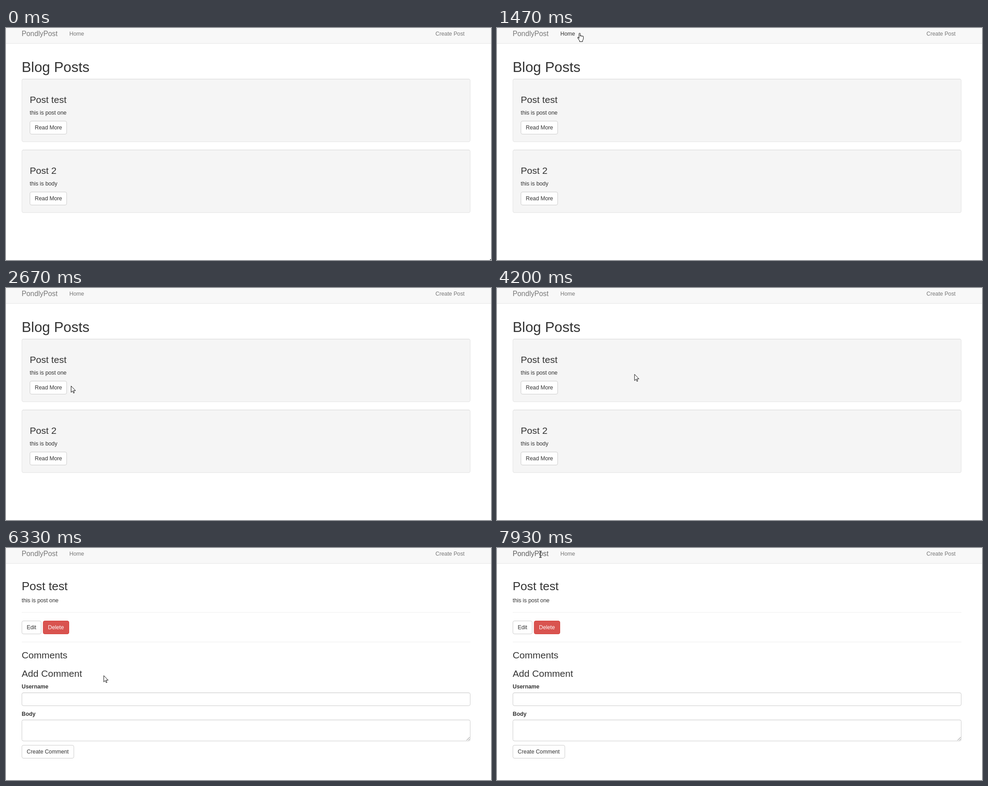
Animation, 1083 px wide and 517 px high, one loop 8 s. Source, as an HTML page:

```html
<!DOCTYPE html>
<html lang="en">
<head>
<meta charset="utf-8">
<title>Blog walkthrough</title>
<style>
html, body { margin: 0; width: 100%; height: 100%; overflow: hidden; background: #fff; }
svg { display: block; }
text { font: 12.32px "Liberation Sans", Arial, sans-serif; fill: #333; white-space: pre; }
.h1 { font-size: 31.68px; }
.h2 { font-size: 26.4px; }
.h3 { font-size: 21.12px; }
.label { font-weight: bold; }
.nav { fill: #777; }
.brand { font-size: 15.84px; }
#brand.on { fill: #5e5e5e; }
#home.on { fill: #333; }
.well { fill: #f5f5f5; stroke: #e3e3e3; }
.btn, .field { fill: #fff; stroke: #ccc; }
.danger { fill: #d9534f; stroke: #d43f3a; }
.white { fill: #fff; }
.btn.on { fill: #e6e6e6; stroke: #adadad; }
.btn.press { fill: #d4d4d4; stroke: #8c8c8c; }
#cursor path { fill: #fff; stroke: #000; stroke-width: 1.1; stroke-linejoin: round; }
#cursor #beam { fill: none; }
</style>
</head>
<body>
<svg width="1083" height="517" viewBox="0 0 1083 517">
  <rect width="1083" height="34" fill="#f8f8f8"/>
  <rect y="34" width="1083" height="1" fill="#e7e7e7"/>
  <g id="list"></g>
  <g id="post"></g>
  <g id="nav"></g>
  <g id="cursor">
    <path id="arrow" transform="scale(.88)" d="M.5.5V16.5L4.2 13 6.6 18.5 8.8 17.6 6.5 12.2H11.7Z"/>
    <path id="hand" transform="scale(.9) translate(-6.5 0)" d="M5 13.5V2a1.5 1.5 0 0 1 3 0V8q0-1.5 1.4-1.5t1.4 1.5v.5q0-1.2 1.3-1.2t1.3 1.5q0-1 1.2-1t1.2 1.5V15l-2 4v2.5h-7.5V19l-4.3-6q-1.2-2.2.6-2.5 1 0 2.4 3Z"/>
    <path id="beam" d="M-3-7H-.8L0-6.3.8-7H3M0-6.3V6.3M-3 7H-.8L0 6.3.8 7H3"/>
  </g>
</svg>
<script>
const $ = id => document.getElementById(id);
const LEFT = 35, WIDTH = 1002;

const text = (x, y, s, cls = '', id = '') => `<text x="${x}" y="${y}" class="${cls}" id="${id}">${s}</text>`;
const box = (x, y, w, h, cls, id = '') =>
  `<rect x="${x + .5}" y="${y + .5}" width="${w - 1}" height="${h - 1}" rx="3.5" class="${cls}" id="${id}"/>`;
const panel = (y, h, cls) => box(LEFT, y, WIDTH, h, cls) +
  `<path d="M${LEFT + 2} ${y + 1.5}h${WIDTH - 4}" stroke="#000" stroke-opacity=".045"/>`;
const button = (x, y, w, s, cls = 'btn', id = '') =>
  box(x, y, w, 30, cls, id) + text(x + 11.3, y + 19, s, cls == 'danger' ? 'white' : '');
const rule = y => `<rect x="${LEFT}" y="${y}" width="${WIDTH}" height="1" fill="#eee"/>`;
const card = (y, title, body, id) => panel(y, 141, 'well') +
  text(53, y + 54, title, 'h3') + text(53, y + 80, body) + button(53, y + 94, 83, 'Read More', 'btn', id);
const input = (y, h, name) => text(LEFT, y - 9, name, 'label') + panel(y, h, 'field');

$('nav').innerHTML = text(LEFT, 18, 'PondlyPost', 'nav brand', 'brand') +
  text(141.5, 17, 'Home', 'nav', 'home') + text(959, 17, 'Create Post', 'nav');

$('list').innerHTML = text(LEFT, 98, 'Blog Posts', 'h1') +
  card(113, 'Post test', 'this is post one', 'more') + card(271, 'Post 2', 'this is body');

$('post').innerHTML = text(LEFT, 94, 'Post test', 'h2') + text(LEFT, 121, 'this is post one') +
  rule(143) + button(LEFT, 162, 44, 'Edit') + button(82.5, 162, 58.5, 'Delete', 'danger') + rule(209) +
  text(LEFT, 246, 'Comments', 'h3') + text(LEFT, 286.5, 'Add Comment', 'h3') +
  input(322, 30, 'Username') + input(382.5, 48, 'Body') +
  '<path d="M1028.5 428.5l7-7M1032.5 428.5l3-3" stroke="#777"/>' +
  button(LEFT, 439, 117, 'Create Comment');

// Pointer moves: first and last step, where to, and the point the path bends towards
const home = [184.5, 11], more = [104, 224], field = [247, 335];
const moves = [
  { from: 0, to: 13, end: [325, 168], bend: [-308, 320] },
  { from: 14, to: 22, end: home },
  { from: 22, to: 27, end: [160, 12] },
  { from: 27, to: 40, end: [145, 218], bend: [20, 12] },
  { from: 42, to: 44, end: [141, 220] },
  { from: 51, to: 56, end: [366, 192] },
  { from: 61, to: 70, end: more, bend: [116, 189] },
  { from: 89, to: 100, end: field, bend: [242, 273] },
  { from: 107, to: 119, end: [97, 14], bend: [310, 170] }
];
const STEP = 1000 / 15, STEPS = 120;
const PRESS = 74, RELEASE = 76, OPEN = 83;

function pointer(step) {
  let pos = [1081, 515];
  for (const { from, to, end, bend } of moves) {
    const u = Math.max(0, Math.min(1, (step - from) / (to - from)));
    const e = u * u * (3 - 2 * u), f = 1 - e;
    pos = pos.map((p, k) => {
      const mid = bend ? bend[k] : (p + end[k]) / 2;
      return f * f * p + 2 * e * f * mid + e * e * end[k];
    });
    if (u < 1) break;
  }
  return pos;
}

const show = (id, on) => { $(id).style.display = on ? '' : 'none'; };
const mark = (id, on, cls = 'on') => $(id).classList.toggle(cls, on);

function draw(now) {
  const step = Math.floor((now + 4) / STEP) % STEPS;
  const [x, y] = pointer(step), detail = step >= OPEN;
  const onBrand = y < 35 && x > 22 && x < 128;
  const onHome = y < 35 && x >= 128 && x < 187;
  const onMore = !detail && x > 53 && x < 136 && y > 207 && y < 237;
  const beam = detail && (y > 322 || y < 100);
  const hand = !beam && (onBrand || onHome || onMore);
  show('list', !detail);
  show('post', detail);
  mark('brand', onBrand);
  mark('home', onHome);
  mark('more', onMore);
  mark('more', step >= PRESS && step < RELEASE, 'press');
  show('beam', beam);
  show('hand', hand);
  show('arrow', !beam && !hand);
  $('cursor').setAttribute('transform', `translate(${x} ${y})`);
}

const start = performance.now();
function tick() {
  draw(performance.now() - start);
  requestAnimationFrame(tick);
}
tick();
</script>
</body>
</html>
```
